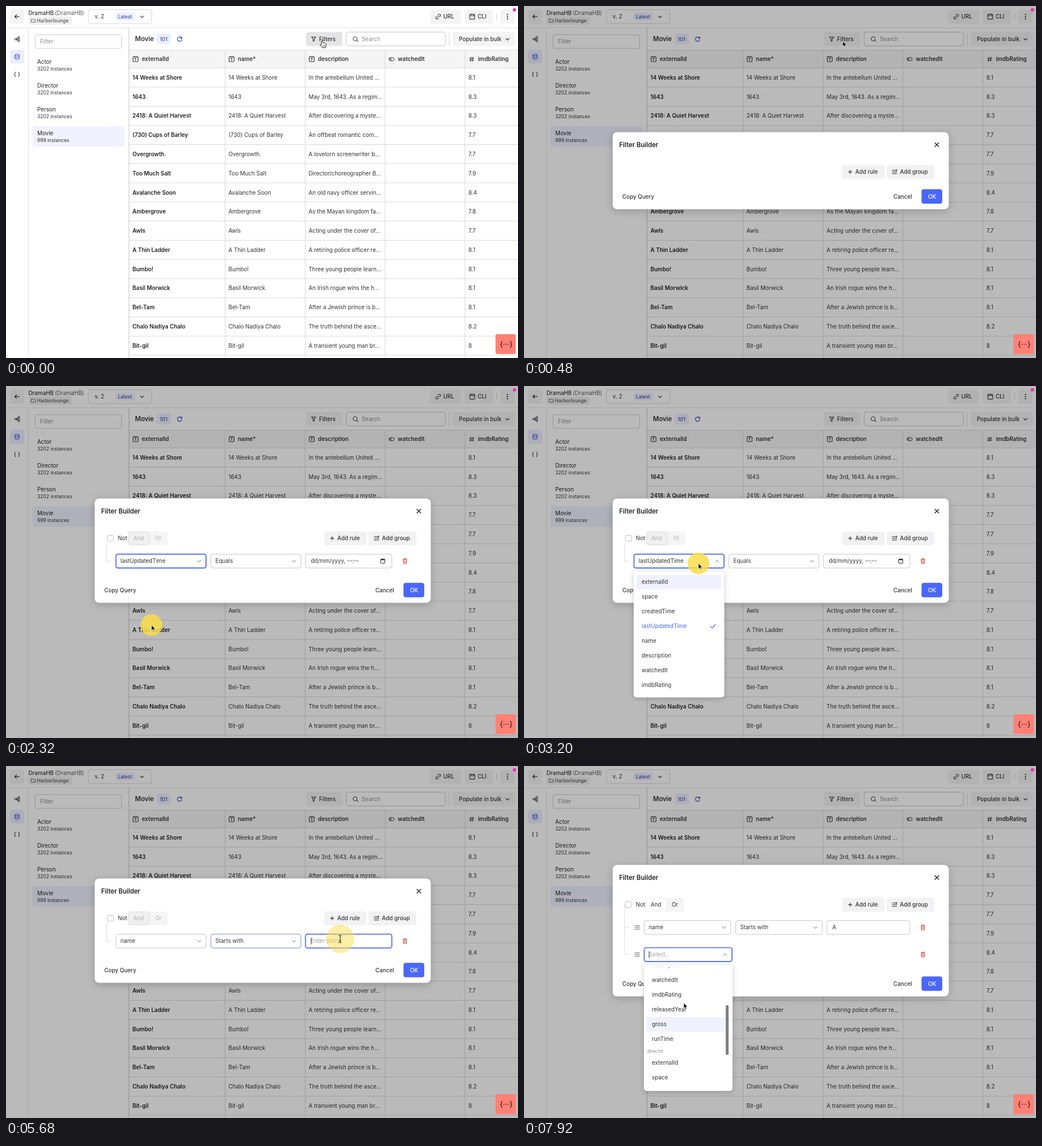
Animation of 901x621 px, one loop 8 s. Source, as an HTML page:

```html
<!DOCTYPE html>
<html lang="en">
<head>
<meta charset="utf-8">
<title>Filter builder</title>
<style>
html, body { margin: 0; width: 100%; height: 100%; overflow: hidden; background: #fff; }
svg { display: block; font-family: Inter, "Open Sans", sans-serif; }
text { white-space: pre; }
.list { filter: drop-shadow(0 2px 4px rgba(0, 0, 0, .22)); }
.modal { filter: drop-shadow(0 3px 7px rgba(0, 0, 0, .2)); }
</style>
</head>
<body>
<svg width="901" height="621" viewBox="0 0 901 621">
  <g id="page"></g>
  <g id="live"></g>
</svg>
<script>
const LOOP = 8000, INK = '#333', BLUE = '#4a67fb', BODY = 9.86, SMALL = 8.45, TITLE = 11.26;
const clamp = (v, lo = 0, hi = 1) => Math.min(hi, Math.max(lo, v));
const within = (t, a, b) => t >= a && t < b;

// Drawing helpers return SVG markup; text is placed by its vertical centre.
const text = (x, y, s, size = BODY, weight = 400, fill = INK) =>
  `<text x="${x}" y="${y + size * .364}" font-size="${size}" font-weight="${weight}" fill="${fill}">${s}</text>`;
const rect = (x, y, w, h, fill = 'none', r = 0, stroke = 'none', sw = .8, more = '') =>
  `<rect x="${x}" y="${y}" width="${w}" height="${h}" rx="${r}" fill="${fill}" stroke="${stroke}" stroke-width="${sw}" ${more}/>`;
const path = (d, stroke = INK, sw = 1.1, fill = 'none') =>
  `<path d="${d}" stroke="${stroke}" stroke-width="${sw}" fill="${fill}" stroke-linejoin="round"/>`;
const at = (x, y, s) => `<g transform="translate(${x} ${y})">${s}</g>`;
const circle = (x, y, r, fill, stroke = 'none') =>
  `<circle cx="${x}" cy="${y}" r="${r}" fill="${fill}" stroke="${stroke}"/>`;
const button = (x, y, w, fill = '#f4f4f5') => rect(x, y, w, 24.6, fill, 4);

const icon = {
  back: path('M4 0H-4M-.6-3.4L-4 0L-.6 3.4', INK, 1.3),
  down: path('M-3.2-1.6L0 1.6L3.2-1.6', INK, 1.2),
  up: path('M-3.2 1.6L0-1.6L3.2 1.6', '#666', 1),
  thin: path('M-3.2-1.6L0 1.6L3.2-1.6', '#666', 1),
  plus: path('M-3.4 0H3.4M0-3.4V3.4', INK, 1.2),
  cross: path('M-3.8-3.8L3.8 3.8M3.8-3.8L-3.8 3.8', '#222', 1.4),
  group: path('M-4.5-3H1M-4.5 0H4.5M-4.5 3H4.5M3-4.8V-1M1.1-2.9H4.9', INK, 1.1),
  check: path('M-4.5 0L-1.5 3L4.5-3.4', BLUE, 1.3),
  text: rect(-4.4, -4.4, 8.8, 8.8, 'none', 1.4, INK, 1.1) + path('M-2.2-2H2.2M0-2V2.6', INK, 1.1),
  bool: rect(-4.6, -2.8, 9.2, 5.6, 'none', 2.8, INK, 1) + circle(-1.8, 0, 1.3, 'none', INK),
  hash: path('M-1.2-4.2L-2.2 4.2M2.2-4.2L1.2 4.2M-4.2-1.6H4.4M-4.6 1.6H4', INK, 1),
  funnel: path('M-3.8-3.6H3.8L1-.2V3L-1 4V-.2Z', INK, 1.1),
  search: circle(-.6, -.6, 3.6, 'none', INK) + path('M2.2 2.2L4.8 4.8'),
  link: path('M-1 1L1-1M-.6-2.2L1-3.8C3-5 5-3 3.8-1L2.2 .6M.6 2.2L-1 3.8C-3 5-5 3-3.8 1L-2.2-.6'),
  panel: rect(-4.4, -3.8, 8.8, 8.2, 'none', 1, INK, 1.1) + path('M-4.4-1.4H4.4M-2.2-5.2V-3M2.2-5.2V-3'),
  refresh: path('M3.6-1.6A3.9 3.9 0 1 0 3.9 .8M3.9-4.2V-1.3H1', '#3545b8', 1.2),
  graph: path('M-1.6-.4L2-3.2M-1.6 .4L2 3.2M-1.6 0H2') +
    [[-3, 0], [3.2, -3.4], [3.2, 0], [3.2, 3.4]].map(p => circle(...p, 1.4, '#fff', INK)).join(''),
  base: path('M-3.8-3C-3.8-5 3.8-5 3.8-3V3C3.8 5-3.8 5-3.8 3ZM-3.8-3C-3.8-1 3.8-1 3.8-3M-3.8 0C-3.8 2 3.8 2 3.8 0', '#3a4bd0', 1),
  folder: path('M-3.6 2.8V-2.8H-.8L.2-1.7H3.6V2.8Z', '#555', .9),
  trash: path('M-4-2.8H4M-1.6-2.8V-4.3H1.6V-2.8M-3-2.8L-2.6 4.3H2.6L3-2.8M-1-.8V2.4M1-.8V2.4', '#cc3b32', 1),
  grip: path('M-4.6-3H4.6M-4.6 0H4.6M-4.6 3H4.6', '#666', 1),
  date: rect(-3.6, -3.2, 7.2, 7, 'none', .8, '#222', 1) + path('M-3.6-2.4H3.6M-2-4.4V-3M2-4.4V-3', '#222', 1.5),
};

const cursors = {
  arrow: path('M0 0V9.6L2.2 7.6L3.8 11L5.3 10.3L3.8 7.1H6.8Z', '#fff', .7, '#000'),
  hand: path('M-1 1C-1-.5 1.2-.5 1.4 1L2 4.2C3 3.6 4 3.8 4.2 4.8C5 4.4 5.8 4.6 6 5.4C7 5.2 7.6 6 7.4 7L6.8 10L6 12.6H.6L-2.6 8.4C-3.8 6.6-2.2 6-1.2 7L-.6 7.6Z', '#111', .9, '#fff') +
    path('M1.4 8.2V10.8M3.2 8.2V10.8M5 8.2V10.8', '#111', .6),
  beam: path('M-2.4-6.4Q0-6.4 0-5V5Q0 6.4-2.4 6.4M2.4-6.4Q0-6.4 0-5M0 5Q0 6.4 2.4 6.4M-1.2 2.6H1.2', '#111', 1),
};

const rows = [
  ['14 Weeks at Shore', 'In the antebellum United ...', 8.1],
  ['1643', 'May 3rd, 1643. As a regim...', 8.3],
  ['2418: A Quiet Harvest', 'After discovering a myste...', 8.3],
  ['(730) Cups of Barley', 'An offbeat romantic com...', 7.7],
  ['Overgrowth.', 'A lovelorn screenwriter b...', 7.7],
  ['Too Much Salt', 'Director/choreographer B...', 7.9],
  ['Avalanche Soon', 'An old navy officer servin...', 8.4],
  ['Ambergrove', 'As the Mayan kingdom fa...', 7.8],
  ['Awls', 'Acting under the cover of...', 7.7],
  ['A Thin Ladder', 'A retiring police officer re...', 8.1],
  ['Bumbo!', 'Three young people learn...', 8.1],
  ['Basil Morwick', 'An Irish rogue wins the h...', 8.1],
  ['Bel-Tam', 'After a Jewish prince is b...', 8.1],
  ['Chalo Nadiya Chalo', 'The truth behind the asce...', 8.2],
  ['Bit-gil', 'A transient young man br...', 8],
];

function drawPage() {
  const ROW = 33.79, TOP = 109.3;
  let s = rect(0, 0, 901, 621, '#fff') + path('M0 38.5H901M39.5 38.5V621', '#e2e2e2', .9);
  s += button(7, 6.4, 25) + at(19.5, 18.7, icon.back);
  s += text(39.5, 12, 'DramaHB', BODY, 500) + text(86, 12, '(DramaHB)', BODY, 400, '#595959');
  s += rect(39.5, 18.5, 76.5, 14.5, '#f0f0f0', 3) + at(48, 25.8, icon.folder) + text(54.5, 25.8, 'Harborlounge', SMALL, 500, '#555');
  s += rect(145, 6.4, 111.5, 24.6, '#fff', 4, '#cdcdcd') + text(156, 18.7, 'v. 2') +
    rect(193, 11.8, 34, 13.6, '#edf0ff', 3) + text(197, 18.7, 'Latest', SMALL, 500, '#3c4bb0') + at(239.5, 19, icon.down);
  s += button(746.5, 6.4, 54.5) + at(760.5, 18.7, icon.link) + text(769.5, 18.7, 'URL', BODY, 500);
  s += button(807, 6.4, 50) + at(820.5, 18.7, icon.panel) + text(830, 18.7, 'CLI', BODY, 500);
  s += path('M863.5 13.5V24', '#ccc', .9) + button(870, 6.4, 25) + [-3.8, 0, 3.8].map(d => circle(882.5, 18.7 + d, 1.15, INK)).join('');

  s += at(19.5, 58.5, icon.graph) + button(7, 77, 25, '#ebeeff') + at(19.5, 89.5, icon.base) + text(13.6, 120, '{ }', 10, 500);
  s += rect(51, 50.6, 152.5, 24.2, '#fff', 4, '#bfbfbf') + text(60, 62.7, 'Filter', BODY, 400, '#8c8c8c');
  s += rect(46.5, 212, 162, 36.3, '#f0f2ff', 4);
  ['Actor', 'Director', 'Person', 'Movie'].forEach((name, i) => {
    const y = 98.2 + i * 42.2;
    s += text(55, y, name, BODY, 400, '#222') + text(55, y + 12.4, i < 3 ? '3202 instances' : '999 instances', SMALL);
  });

  s += text(227, 58.2, 'Movie', TITLE, 600) + rect(265.5, 48.5, 24.5, 19, '#edf0ff', 3) +
    text(270.5, 58.2, '101', 9.15, 500, '#3c4bb0') + at(305.5, 58.4, icon.refresh);
  s += rect(598.6, 46, 174.6, 24.4, '#fff', 4, '#b5b5b5') + at(615, 58.4, icon.search) + text(626, 58.2, 'Search', BODY, 400, '#8c8c8c');
  s += path('M780 46V70.5', '#d5d5d5', .9) + button(786, 46, 110) + text(797, 58.2, 'Populate in bulk', BODY, 500) + at(882.5, 58.6, icon.down);

  s += rect(216.5, 78, 690, TOP - 78, '#f5f5f5');
  [['text', 228, 'externalId'], ['text', 397, 'name*'], ['text', 538, 'description'], ['bool', 678.5, 'watchedIt'], ['hash', 819.5, 'imdbRating']]
    .forEach(([kind, x, label]) => s += at(x, 93.8, icon[kind]) + text(x + 11, 93.8, label, BODY, 600));
  rows.forEach(([name, about, rate], i) => {
    const y = TOP + (i + .5) * ROW;
    s += text(222.5, y, name, BODY, 600, '#222') + text(391.5, y, name) + text(532.5, y, about) + text(813.8, y, rate);
  });
  let lines = 'M216.5 78H901';
  for (let i = 0; i < 16; i++) lines += `M216.5 ${TOP + i * ROW}H901`;
  for (const x of [385.5, 526.5, 667, 807.7]) lines += `M${x} 78V621`;
  return s + path(lines, '#d6d6d6', .9) + path('M216.3 38.5V621', '#c4c4c4', 1);
}

const fields = ['externalId', 'space', 'createdTime', 'lastUpdatedTime', 'name', 'description', 'watchedIt', 'imdbRating',
  'releasedYear', 'gross', 'runTime', '#director', 'externalId', 'space', 'createdTime', 'lastUpdatedTime', 'name', 'description'];
const operators = ['Equals', 'Greater than', 'Greater or equal than', 'Is one of', 'Is not empty', 'Is empty',
  'Less than', 'Less or equal than', 'Starts with'];

// Pointer stops: time, x, y.
const stops = [[0, 556, 61], [160, 556, 61], [480, 561, 62], [920, 597, 293], [1040, 597, 293], [1280, 310, 316], [1560, 310, 316],
  [1920, 255, 418], [2080, 255, 424], [2280, 255, 424], [2760, 307, 313], [3200, 307, 313], [3480, 250, 450], [3640, 250, 450],
  [3960, 425, 309], [4060, 425, 309], [4320, 433, 538], [4960, 433, 538], [5360, 588, 305], [6400, 588, 305],
  [6760, 597, 268], [6920, 597, 268], [7160, 288, 333], [7280, 288, 333], [7480, 281, 418], [LOOP, 281, 418]];
const clicks = [140, 1000, 1320, 2200, 3080, 3600, 4000, 4860, 5440, 6840, 7200];
const hands = [[0, 240], [900, 1080], [1700, 2280], [3360, 3660], [4240, 4980], [6700, 6960]];

function pointer(t) {
  const i = stops.findIndex(s => s[0] > t), [t0, x0, y0] = stops[i - 1], [t1, x1, y1] = stops[i];
  const u = (t - t0) / (t1 - t0), e = u * u * (3 - 2 * u);
  return [x0 + (x1 - x0) * e, y0 + (y1 - y0) * e];
}

const focus = (t, on, off = 1e9) => clamp(Math.min((t - on) / 260, 1 - (t - off) / 340));
const caret = (x, y) => path(`M${x} ${y - 6}V${y + 6}`, '#222', .9);

function field(x, w, y, glow) {
  const box = [x, y - 12.2, w, 24.4];
  return rect(...box, '#fff', 3.5, '#c6c6c6', 1) +
    (glow ? rect(...box, 'none', 3.5, BLUE, 1.7, `opacity="${glow}"`) : '');
}
function select(x, w, y, label, glow, open, typing) {
  return field(x, w, y, glow) + text(x + 8, y, label || 'Select...', BODY, 400, label ? INK : '#a3a3a3') +
    at(x + w - 12, y, open ? icon.up : icon.thin) + (typing ? caret(x + 8.6, y) : '');
}

function list(t, from, to, x, w, row, items, chosen, scroll, [, py], thumb, ratio, held) {
  if (!within(t, from, to)) return '';
  const top = row + 18, first = row + 37, show = clamp(Math.min((t - from) / 110, (to - t) / 110));
  let active = t - from < 400 ? 0 : Math.floor((py - first + 13 + scroll) / 26);
  if (held !== undefined) active = held;
  active = clamp(active, 0, items.length - 1);
  let s = '';
  items.forEach((name, i) => {
    const y = first + i * 26 - scroll - (i > 11 ? 10 : 0);
    if (name[0] === '#') { s += text(x + 6, y - 4.5, name.slice(1), 7.7, 400, '#8c8c8c'); return; }
    if (i === active) s += rect(x + 5, y - 12.7, w - 11, 25.4, '#f0f1ff', 3);
    s += text(x + 14, y, name, BODY, 400, i === chosen ? BLUE : INK);
    if (i === chosen) s += at(x + w - 20, y, icon.check);
  });
  if (scroll) s += rect(x + w - 12, top + 3 + scroll * ratio, 5, thumb, '#808080', 2.5);
  return `<g class="list" opacity="${show}" transform="translate(0 ${top}) scale(1 ${.8 + .2 * show}) translate(0 ${-top})">
    <clipPath id="view${from}">${rect(x, top + 4, w, 214)}</clipPath>
    ${rect(x, top, w, 222.5, '#fff', 5)}<g clip-path="url(#view${from})">${s}</g></g>`;
}

function dialog(t, pos) {
  const rules = t < 1040 ? 0 : t < 6880 ? 1 : 2, h = 136 + 48 * rules, top = 290.5 - h / 2, end = top + h;
  const head = top + 70.2, r1 = top + 110.4, r2 = top + 158.2;
  const hot = within(t, 900, 1080) || within(t, 6700, 6960);
  let s = `<g class="modal">${rect(156, top, 591.5, h, '#fff', 8)}</g>`;
  s += text(167.5, top + 22.2, 'Filter Builder', TITLE, 600, '#222') + at(726.5, top + 22.3, icon.cross);
  s += button(560, head - 12.3, 74.5, hot ? '#e6e6ea' : '#f2f2f5') + at(574, head, icon.plus) + text(583, head, 'Add rule', BODY, 500);
  s += button(638, head - 12.3, 84, '#f2f2f5') + at(652, head, icon.group) + text(661.5, head, 'Add group', BODY, 500);
  s += text(173, end - 22.5, 'Copy Query', BODY, 500) + text(650, end - 22.5, 'Cancel', BODY, 500) +
    rect(699.5, end - 35.2, 36.5, 25.4, BLUE, 4) + text(711, end - 22.5, 'OK', BODY, 500, '#fff');
  if (!rules) return s;

  const both = rules === 2;
  s += path(both ? `M182 ${head}H177V${r2}H184.5M177 ${r1}H184.5` : `M177 ${head + 8}V${r1}H184.5`, '#d9d9d9', 1);
  s += rect(178.5, head - 5.2, 10.4, 10.4, '#fff', 2, '#bfbfbf', 1) + text(196.8, head, 'Not');
  if (both) {
    s += rect(214, head - 12, 67, 24, '#f4f4f5', 3.5) + rect(214.5, head - 11.5, 35.5, 23, '#fff', 3.5, '#ececec') +
      text(223, head, 'And') + text(260, head, 'Or');
  } else {
    s += rect(215, head - 12, 69, 24, '#f5f5f5', 3.5) + rect(215.5, head - 11.5, 36.5, 23, '#f0f0f0', 3.5, '#d9d9d9') +
      text(224, head, 'And', BODY, 400, '#b3b3b3') + text(262.5, head, 'Or', BODY, 400, '#b3b3b3');
  }

  const picked = t >= 2240, named = t >= 3640;
  const x1 = both ? 211.5 : 193.5, w1 = both ? 152.5 : picked ? 158.5 : 161, x2 = both ? 372.5 : 360.5, x3 = both ? 533 : 527;
  s += select(x1, w1, r1, picked && (named ? 'name' : 'lastUpdatedTime'), focus(t, 1320, 4000),
    within(t, 1320, 2240) || within(t, 3080, 3640), within(t, 1320, 2240));
  if (picked) {
    const open = within(t, 4000, 4880), glow = focus(t, 5440, 6840);
    s += select(x2, both ? 152.5 : 158.5, r1, t < 4880 ? 'Equals' : 'Starts with', focus(t, 4000, 5440), open, open);
    s += field(x3, 679 - x3, r1, glow);
    const typed = t >= 6040;
    s += !named ? text(x3 + 9.5, r1, 'dd/mm/yyyy, --:--') + at(663, r1, icon.date)
      : typed ? text(x3 + 9.5, r1, 'A') : text(x3 + 9.5, r1, 'Enter string', BODY, 400, '#9c9c9c');
    if (within(t, 5440, 6840) && (t - 5440) % 1000 < 500) s += caret(x3 + (typed ? 17 : 10), r1);
  }
  s += at(702, r1, icon.trash);
  if (both) {
    const open = t >= 7200;
    s += at(199.2, r1, icon.grip) + at(199.2, r2, icon.grip) + select(211.5, 154.5, r2, '', focus(t, 7200), open, open) + at(702, r2, icon.trash);
  }

  const opScroll = 22 * clamp((t - 4400) / 160);
  const scroll = t < 7840 ? 190 * clamp((t - 7640) / 200) : 190 - 42 * clamp((t - 7840) / 80);
  s += list(t, 1320, 2320, 193, 162, r1, fields, -1, 0, pos);
  s += list(t, 3080, 3740, 193, 159.5, r1, fields, 3, 0, pos);
  s += list(t, 4000, 4980, 360, 159.5, r1, operators, 0, opScroll, pos, 192, .9);
  s += list(t, 7200, 9000, 211, 156, r2, fields, -1, scroll, pos, 88, .46, t >= 7840 ? 9 : undefined);
  return s;
}

function drawLive(t) {
  const pos = pointer(t), p = clamp((t - 240) / 180), ease = 1 - (1 - p) ** 3;
  let s = button(528, 46, 64, t < 240 ? '#e4e4e6' : '#f4f4f5') + at(541.5, 58.3, icon.funnel) + text(551, 58.2, 'Filters', BODY, 500);
  if (p) {
    s += rect(0, 0, 901, 621, '#000', 0, 'none', 0, `opacity="${.27 * p}"`);
    s += `<g opacity="${p}" transform="translate(561 62) scale(${.2 + .8 * ease}) translate(-561 -62)">${dialog(t, pos)}</g>`;
  }
  s += rect(892, 4, 5.5, 5.5, '#ee2fb2', 1) + rect(861.5, 579, 35.5, 35, '#ff8075', 3) + text(869, 596.5, '{···}', 12.5, 500, '#3d2320');
  for (const c of clicks) {
    const age = t - c;
    if (within(age, 0, 320))
      s += `<g opacity="${Math.min(.85, (320 - age) / 160)}">${circle(...pos, 13 + .05 * age, '#fadd4b')}</g>`;
  }
  const kind = hands.some(([a, b]) => within(t, a, b)) ? 'hand' : within(t, 5300, 6500) ? 'beam' : 'arrow';
  return s + at(...pos, cursors[kind]);
}

const live = document.getElementById('live');
document.getElementById('page').innerHTML = drawPage();
function tick() {
  live.innerHTML = drawLive(performance.now() % LOOP);
  requestAnimationFrame(tick);
}
tick();
</script>
</body>
</html>
```
